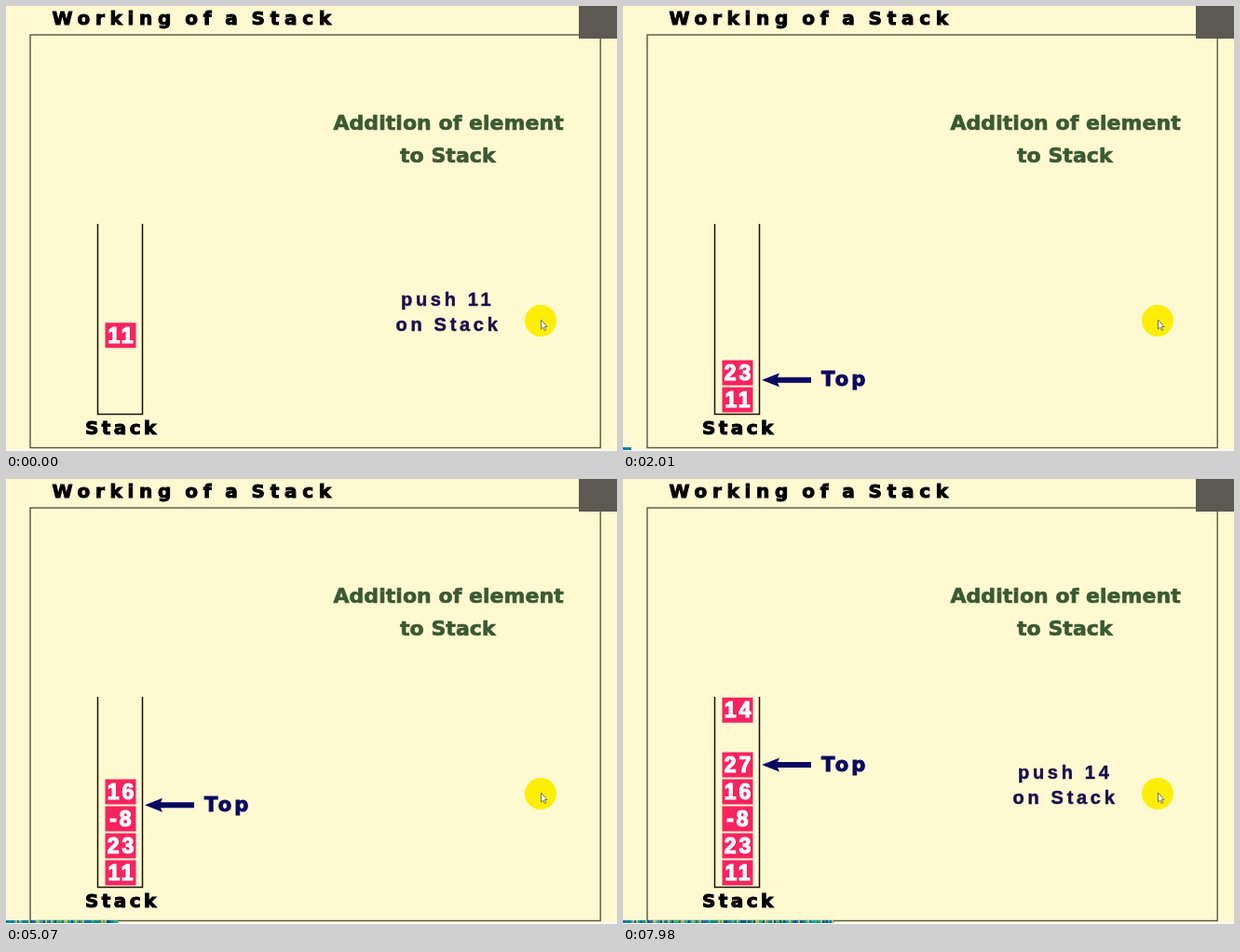
Recreate the animation shown at these times as an HTML page. Size 656 px wide and 478 px high, loop 8000 ms.

```html
<!DOCTYPE html>
<html lang="en">
<head>
<meta charset="utf-8">
<title>Working of a Stack</title>
<style>
  html, body { margin: 0; width: 100%; height: 100%; overflow: hidden; background: #fff9d2; }
  svg { display: block; width: 656px; height: 478px; }
  text { font-weight: bold; white-space: pre; }
  .wide { font-family: "DejaVu Sans", sans-serif; stroke-width: 1; }
  .title { font-size: 20px; letter-spacing: 5.7px; word-spacing: -3.5px; stroke: #000; }
  .heading { font-size: 22px; letter-spacing: .05px; fill: #3a5a31; stroke: #3a5a31; stroke-width: .7; }
  .label { font-size: 20px; letter-spacing: 3.4px; stroke: #000; }
  .top { font-size: 21px; letter-spacing: 3.2px; fill: #0b0960; stroke: #0b0960; }
  .command { font: bold 20px "Liberation Sans", Arial, sans-serif; letter-spacing: 3.7px; fill: #1a0f4c; stroke: #1a0f4c; stroke-width: .5; }
  .number { font: bold 23px "Liberation Sans", Arial, sans-serif; letter-spacing: 2.8px; fill: #fff; stroke: #fff; stroke-width: 1.2; text-anchor: middle; }
</style>
</head>
<body>
<svg viewBox="0 0 656 478">
  <rect width="656" height="478" fill="#fff9d2"/>
  <rect y="476" width="656" height="2" fill="#fffef4"/>
  <rect x="26" y="31" width="612.2" height="443.5" fill="none" stroke="#59563f" stroke-width="1.4"/>
  <rect x="615" width="41" height="35" fill="#5c5852"/>

  <text class="wide title" x="49.5" y="20">Working of a Stack</text>
  <text class="wide heading" x="351.5" y="133">Addition of element</text>
  <text class="wide heading" x="423" y="168">to Stack</text>
  <text class="wide label" x="85" y="460">Stack</text>

  <g id="command">
    <text id="verb" class="command" x="424" y="322"></text>
    <text class="command" x="418.5" y="349">on Stack</text>
  </g>

  <path d="M98.5 234V438.5H146.5V234" fill="none" stroke="#15130c" stroke-width="1.5"/>
  <g id="boxes"></g>

  <g id="pointer">
    <path d="M149 0L168-7.5L166-3H202V3H166L168 7.5Z" fill="#0b0960"/>
    <text class="wide top" x="213" y="6.5">Top</text>
  </g>

  <circle cx="574" cy="338" r="17" fill="#fdee08"/>
  <path d="M574.5 337V347L576.7 345L578.3 348.5L579.8 347.8L578.3 344.5H581Z" fill="#fff" stroke="#555" stroke-width=".8"/>

  <clipPath id="stripClip"><rect id="stripWidth" y="474" height="3"/></clipPath>
  <g id="strip" clip-path="url(#stripClip)"></g>
</svg>
<script>
  const LOOP = 8000, FADE = 335, FALL = 912, SHIFT = 180;
  const START_Y = 74, FLOOR_Y = 423, STEP = 29;

  // "at" is when each box begins to fall.
  const pushes = [
    { value: '11', at: -730 },
    { value: '23', at: 967 },
    { value: '-8', at: 2512 },
    { value: '16', at: 4068 },
    { value: '27', at: 5587, verb: 'Push' },
    { value: '14', at: 7202 }
  ];

  const $ = id => document.getElementById(id);
  const ramp = (t, from, length) => Math.min(1, Math.max(0, (t - from) / length));

  function add(parent, name, attributes, text = '') {
    const node = document.createElementNS('http://www.w3.org/2000/svg', name);
    for (const key in attributes) node.setAttribute(key, attributes[key]);
    node.textContent = text;
    return parent.appendChild(node);
  }

  pushes.forEach((push, i) => {
    push.slot = FLOOR_Y - i * STEP;
    push.box = add($('boxes'), 'g', {});
    push.parts = [
      add(push.box, 'rect', { x: 106.5, y: -13.5, width: 33, height: 27, fill: '#f6235f' }),
      add(push.box, 'text', { class: 'number', x: 124.4, y: 8 }, push.value)
    ];
  });

  const stripColors = ['#1769c8', '#16a7b5', '#35b653', '#174f91', '#b4bd43', '#128b8e'];
  for (let i = 0; i < 115; i++) {
    const noise = Math.abs(Math.sin(i * 12.99) * 437.6) % 1;
    add($('strip'), 'rect', { x: i * 2, y: 474, width: 2, height: 3, fill: stripColors[Math.floor(noise * 6)] });
  }

  function draw(t) {
    let pointerY = FLOOR_Y, commandAlpha = 0;
    pushes.forEach(({ value, verb = 'push', at, slot, box, parts }, i) => {
      const landed = at + FALL;
      const y = START_Y + (slot - START_Y) * ramp(t, at, FALL);
      box.setAttribute('transform', `translate(0 ${y})`);
      // The tile and its number fade separately, so the number stays pale on pink.
      parts.forEach(part => part.setAttribute('opacity', ramp(t, at - FADE, FADE)));
      if (i) pointerY -= STEP * ramp(t, landed, SHIFT);

      const alpha = ramp(t, at - 360, 150) * (1 - ramp(t, landed - 100, 150));
      if (alpha > 0) {
        commandAlpha = alpha;
        $('verb').textContent = `${verb} ${value}`;
      }
    });
    $('command').setAttribute('opacity', commandAlpha);
    $('pointer').setAttribute('transform', `translate(0 ${pointerY})`);
    $('pointer').setAttribute('opacity', ramp(t, pushes[0].at + FALL, SHIFT));
    $('stripWidth').setAttribute('width', Math.max(0, (t - 1765) * .0364));
  }

  const begin = performance.now();
  function tick() {
    draw((performance.now() - begin) % LOOP);
    requestAnimationFrame(tick);
  }
  tick();
</script>
</body>
</html>
```
